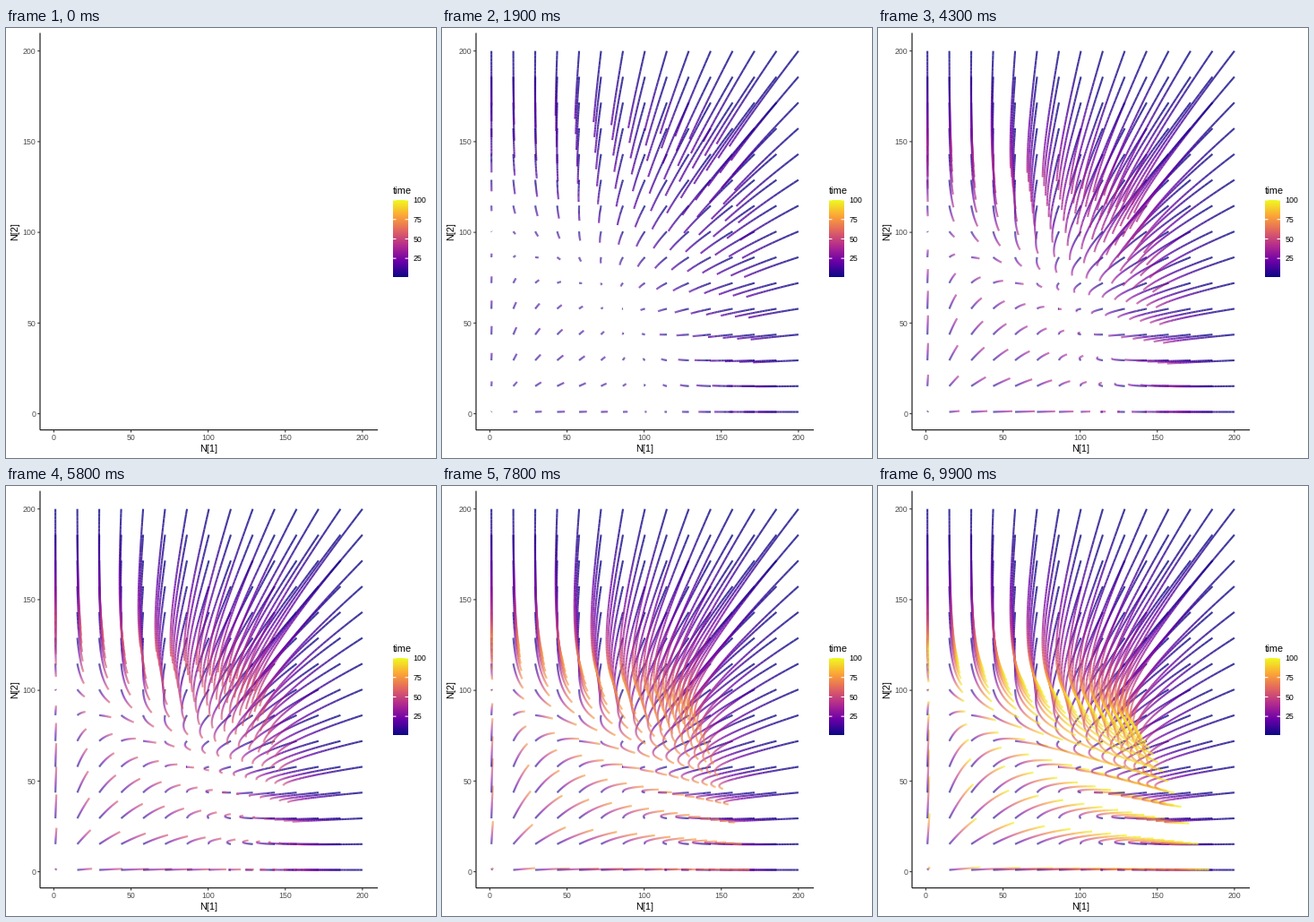
Recreate the animation shown at these times as a matplotlib script. Size 480x480 px, loop 10000 ms.

```python
import numpy as np
import matplotlib
import matplotlib.pyplot as plt
from matplotlib.animation import FuncAnimation
from matplotlib.collections import LineCollection
from matplotlib.colors import LinearSegmentedColormap

STAGE = 480
STEPS = 100
LEFT, RIGHT, TOP, BOTTOM = 38.0, 415.04, 5.5, 448.7
LOW, HIGH = 1 - 9.95, 200 + 9.95
GREY = "#4d4d4d"

plt.rcParams["font.family"] = ["Liberation Sans", "DejaVu Sans"]
plasma = matplotlib.colormaps["plasma"]
cmap = LinearSegmentedColormap.from_list("time", plasma(np.linspace(0, 1, 6)))


def px(v):
    return LEFT + (v - LOW) / (HIGH - LOW) * (RIGHT - LEFT)


def py(v):
    return BOTTOM - (v - LOW) / (HIGH - LOW) * (BOTTOM - TOP)


def simulate():
    """Two competing species; the first one's self-limitation fades."""
    start = np.linspace(1, 200, 15)
    n1, n2 = (g.ravel() for g in np.meshgrid(start, start))
    path = [(n1, n2)]
    for a11 in np.linspace(0.01, 0.0025, STEPS)[:-1]:
        d1 = 0.01 * n1 * (1 - a11 * n1 - 0.004 * n2)
        d2 = 0.01 * n2 * (1 - 0.01 * n2 - 0.005 * n1)
        n1, n2 = n1 + d1, n2 + d2
        path.append((n1, n2))
    n1, n2 = np.array(path).transpose(1, 2, 0)
    return np.stack([px(n1), py(n2)], axis=-1)


fig = plt.figure(figsize=(STAGE / 72, STAGE / 72), dpi=72, facecolor="white")
ax = fig.add_axes([0, 0, 1, 1])
ax.axis("off")


def line(xs, ys, color, width=1.07, z=3):
    ax.plot(xs, ys, color=color, lw=width, solid_capstyle="butt",
            snap=False, zorder=z)


def label(x, y, text, size=8.8, color=GREY, ha="center", **kw):
    ax.text(x, y, text, size=size, color=color, ha=ha,
            va=kw.pop("va", "baseline"), **kw)


def draw_axes():
    line([LEFT, LEFT], [TOP, BOTTOM], "black")
    line([LEFT, RIGHT], [BOTTOM, BOTTOM], "black")
    for v in range(0, 201, 50):
        line([px(v)] * 2, [BOTTOM, BOTTOM + 2.75], "#333333")
        line([LEFT - 2.75, LEFT], [py(v)] * 2, "#333333")
        label(px(v), 460, str(v))
        label(LEFT - 4.95, py(v) + 3.2, str(v), ha="right")
    label((LEFT + RIGHT) / 2, 472.6, "N[1]", 11, "black")
    label(15.6, (TOP + BOTTOM) / 2, "N[2]", 11, "black", ha="right",
          va="center", rotation=90)


def draw_legend():
    x0, x1, y0, y1 = 432, 449, 192, 278
    ramp = np.linspace(1, 0, 300)[:, None]
    ax.imshow(ramp, cmap=cmap, extent=(x0, x1, y1, y0), aspect="auto",
              interpolation="nearest", zorder=2)
    for v in (25, 50, 75, 100):
        y = y1 - (v - 1) / 99 * (y1 - y0)
        line([x0, x0 + 3.46], [y, y], "white")
        line([x1 - 3.46, x1], [y, y], "white")
        label(x1 + 5.3, y + 3.2, str(v), color="black", ha="left")
    label(x0 - 0.5, 185.2, "time", 11, "black", ha="left")


draw_axes()
draw_legend()
ax.set_xlim(0, STAGE)
ax.set_ylim(STAGE, 0)

track = simulate()
segments = np.stack([track[:, :-1], track[:, 1:]], axis=2)
colors = cmap(np.arange(STEPS - 1) / (STEPS - 1))
colors[:, 3] = 0.8

trails = LineCollection([], linewidths=2.13, capstyle="butt", snap=False,
                        zorder=2)
ax.add_collection(trails, autolim=False)


def update(i):
    trails.set_segments(segments[:, :i].reshape(-1, 2, 2))
    trails.set_color(np.tile(colors[:i], (len(track), 1)))
    return [trails]


anim = FuncAnimation(fig, update, frames=STEPS, interval=100, repeat=True,
                     repeat_delay=0, blit=False)
plt.show()
```
